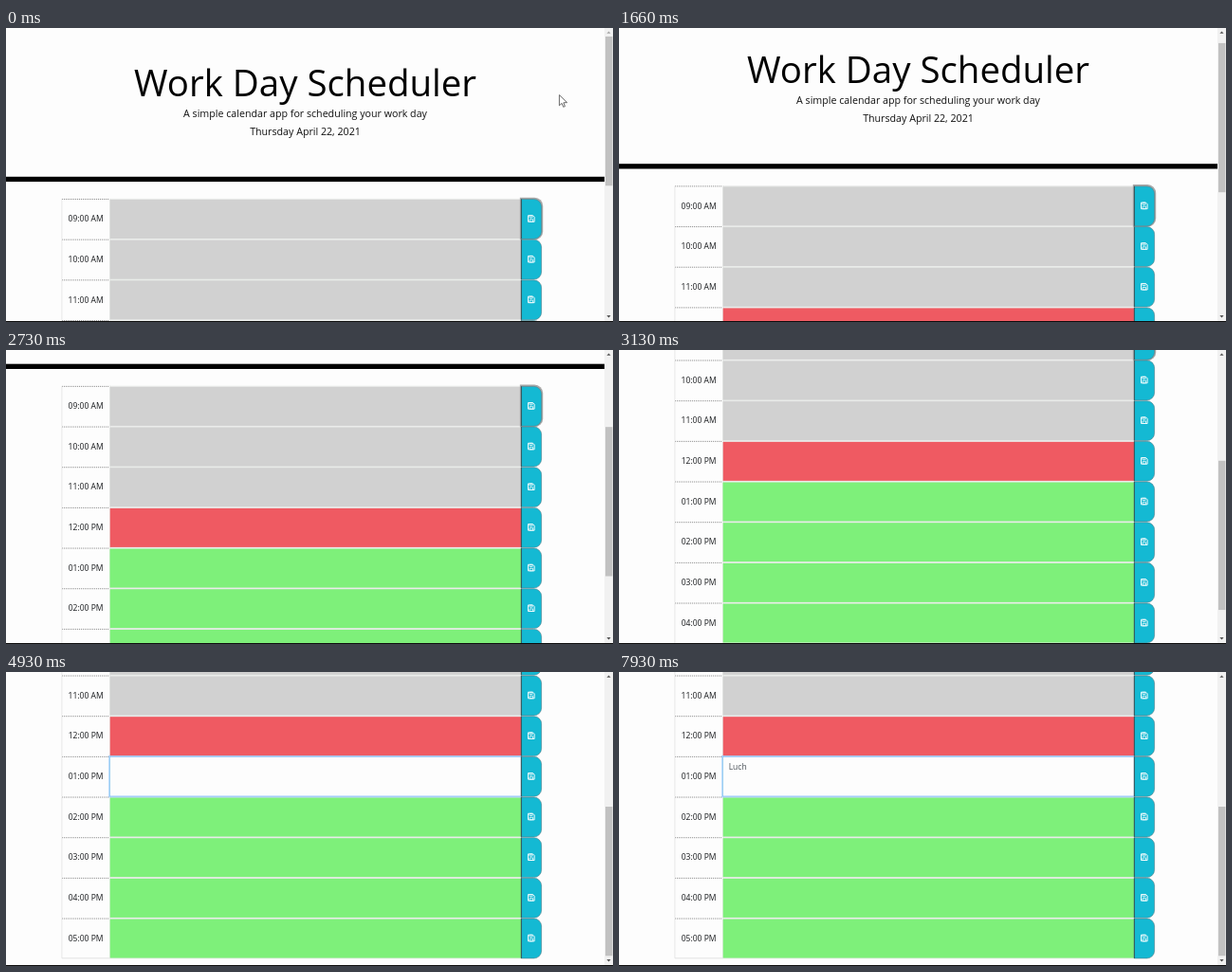
An HTML page with a canvas for the animation above (8 s loop, 640 by 310 pixels).

```html
<!DOCTYPE html>
<html lang="en">
<head>
<meta charset="utf-8">
<title>Work Day Scheduler</title>
<style>
html, body { margin: 0; width: 100%; height: 100%; overflow: hidden; background: #fdfdfd; }
canvas { display: block; width: 640px; height: 310px; }
</style>
</head>
<body>
<canvas id="stage"></canvas>
<script>
const W = 640, H = 310, LOOP = 8000, FPS = 15;
const FONT = '"Open Sans", "Noto Sans", sans-serif';
const PAPER = '#fdfdfd', GREY = '#d1d1d1', RED = '#ef5a62', GREEN = '#7ef07a', TEAL = '#14b9d3';
const HOURS = ['09:00 AM', '10:00 AM', '11:00 AM', '12:00 PM', '01:00 PM',
  '02:00 PM', '03:00 PM', '04:00 PM', '05:00 PM'];
const ROW_TOP = 180.4, ROW_STEP = 128 / 3, VIEW_W = 631;
const EDIT_ROW = 4, NOON_ROW = 3;
const MAX_SCROLL = 261.8;

// time, scroll offset
const SCROLL = [[1333, 0], [1400, 1.5], [1667, 13.6], [2133, 64], [2533, 134], [2667, 135],
  [2733, 142], [3133, 212], [3400, 253], [3533, MAX_SCROLL]];
const TYPED = [[6867, 'L'], [7067, 'Lu'], [7267, 'Luc'], [7333, 'Luch']];

const canvas = document.getElementById('stage');
const ctx = canvas.getContext('2d');
const dpr = window.devicePixelRatio || 1;
canvas.width = W * dpr;
canvas.height = H * dpr;

const clamp = (v, lo = 0, hi = 1) => Math.min(hi, Math.max(lo, v));

function rect(x, y, w, h, color) {
  ctx.fillStyle = color;
  ctx.fillRect(x, y, w, h);
}

function text(str, x, y, size, color, align = 'center') {
  ctx.font = `${size}px ${FONT}`;
  ctx.textAlign = align;
  ctx.fillStyle = color;
  ctx.fillText(str, x, y);
}

function line(x1, y1, x2, y2, color, width = 1, dash = []) {
  ctx.beginPath();
  ctx.setLineDash(dash);
  ctx.moveTo(x1, y1);
  ctx.lineTo(x2, y2);
  ctx.strokeStyle = color;
  ctx.lineWidth = width;
  ctx.stroke();
  ctx.setLineDash([]);
}

function poly(points, fill, stroke) {
  ctx.beginPath();
  points.forEach(([x, y]) => ctx.lineTo(x, y));
  ctx.closePath();
  if (fill) { ctx.fillStyle = fill; ctx.fill(); }
  if (stroke) { ctx.strokeStyle = stroke; ctx.stroke(); }
}

// Monotone cubic through the given points
function follow(points, t) {
  const last = points.length - 1;
  if (t <= points[0][0]) return points[0][1];
  if (t >= points[last][0]) return points[last][1];
  const slope = i => (points[i + 1][1] - points[i][1]) / (points[i + 1][0] - points[i][0]);
  const tangent = i => {
    if (i === 0 || i === last) return slope(Math.min(i, last - 1));
    const a = slope(i - 1), b = slope(i);
    return a + b ? 2 * a * b / (a + b) : 0;
  };
  const i = points.findIndex(p => p[0] > t) - 1;
  const [t0, v0] = points[i], [t1, v1] = points[i + 1];
  const h = t1 - t0, u = (t - t0) / h, r = 1 - u;
  return v0 * (1 + 2 * u) * r * r + tangent(i) * h * u * r * r
    + v1 * u * u * (3 - 2 * u) - tangent(i + 1) * h * u * u * r;
}

function tab(x, y, w, h, r) {
  ctx.beginPath();
  ctx.roundRect(x, y, w, h, [0, r, r, 0]);
}

function saveIcon(cx, cy) {
  ctx.save();
  ctx.translate(cx, cy);
  ctx.lineWidth = 1;
  ctx.lineJoin = 'round';
  poly([[-3.3, -3.3], [1.7, -3.3], [3.3, -1.7], [3.3, 3.3], [-3.3, 3.3]], null, '#f4fcfd');
  ctx.lineWidth = 0.8;
  ctx.strokeRect(-1.8, -3.2, 3, 2.1);
  ctx.strokeRect(-1.8, 0.8, 3.6, 2.5);
  ctx.restore();
}

function saveButton(y, focused) {
  if (focused) {
    tab(541.8, y - 1.7, 24.4, 44.6, 9);
    ctx.fillStyle = '#a9a9a9';
    ctx.fill();
  }
  tab(543.2, y + 0.1, 21.4, 41.9, 8);
  ctx.fillStyle = TEAL;
  ctx.fill();
  ctx.strokeStyle = '#5d7f86';
  ctx.lineWidth = 0.6;
  ctx.stroke();
  line(543.4, y, 543.4, y + 42, '#26444a', 0.8);
  saveIcon(553.8, y + 20.6);
}

function editor(y, focus, note) {
  const h = 42;
  rect(109.5, y + 0.6, 434, 41, GREEN);
  ctx.globalAlpha = focus;
  rect(109.5, y, 434, h, PAPER);
  ctx.strokeStyle = 'rgba(0,123,255,.25)';
  ctx.lineWidth = 1.6;
  ctx.strokeRect(108.7, y - 0.6, 435.2, h + 0.9);
  ctx.strokeStyle = '#80bdff';
  ctx.lineWidth = 0.55;
  ctx.strokeRect(109.5, y + 0.1, 433.7, h - 0.4);
  ctx.globalAlpha = 1;
  if (note) text(note, 115.7, y + 14.2, 8.533, '#495057', 'left');
}

function row(i, y, focus, note) {
  if (y > H || y + 44 < 0) return;
  line(59, y + 0.1, 109.5, y + 0.1, '#777', 0.8, [1.1, 0.9]);
  line(58.9, y, 58.9, y + 42, '#e2e2e2', 0.8);
  text(HOURS[i], 84.1, y + 23.8, 8.533, '#16181b');
  rect(109, y - 0.6, 434.5, 43, '#e9ebe9');
  if (i === EDIT_ROW) editor(y, focus, note);
  else rect(109.7, y + 0.6, 433.6, 41, i < NOON_ROW ? GREY : i === NOON_ROW ? RED : GREEN);
}

function scrollbar(offset) {
  const ends = [[3, 5.8, 3.6, offset > 0 ? '#505050' : '#a3a3a3'],
    [303, 303, 305.2, offset < MAX_SCROLL ? '#505050' : '#505050']];
  rect(VIEW_W, 0, 9, H, '#f1f1f1');
  rect(VIEW_W + 1, 9 + offset * 0.508, 7.4, 157.3, '#c1c1c1');
  poly([[633.4, 5.8], [637.6, 5.8], [635.5, 3.4]], ends[0][3]);
  poly([[633.4, 303], [637.6, 303], [635.5, 305.4]], ends[1][3]);
}

function pointer(x, y) {
  ctx.save();
  ctx.translate(x, y);
  ctx.lineWidth = 0.8;
  ctx.lineJoin = 'miter';
  poly([[0.4, 0.6], [0.4, 11.8], [3, 9.4], [4.7, 13.3], [6.4, 12.5], [4.8, 8.8], [8.5, 8.6]],
    '#fff', '#444');
  ctx.restore();
}

function drawPointer(t) {
  if (t < 1133) return pointer(583, 70);
  if (t < 3733) return;
  const u = clamp((t - 3733) / 800);
  const x = 576 - 236 * u * u * (3 - 2 * u);
  if (x > 543) pointer(x, 81 + 24 * u);
}

function draw(t) {
  const offset = follow(SCROLL, t);
  const focus = t < 4860 ? 0 : t < 4930 ? 0.5 : 1;
  const note = TYPED.reduce((s, [at, str]) => t >= at ? str : s, '');

  ctx.setTransform(dpr, 0, 0, dpr, 0, 0);
  rect(0, 0, W, H, PAPER);

  ctx.save();
  ctx.translate(0, -offset);
  text('Work Day Scheduler', 315.5, 72, 38.4, '#000');
  text('A simple calendar app for scheduling your work day', 315.5, 93.6, 10.667, '#111');
  text('Thursday April 22, 2021', 315.5, 112.8, 10.667, '#111');
  rect(0, 156.8, VIEW_W, 5.3, '#000');
  ctx.restore();

  const top = i => ROW_TOP + i * ROW_STEP - offset;
  HOURS.forEach((_, i) => { if (i !== EDIT_ROW) row(i, top(i)); });
  row(EDIT_ROW, top(EDIT_ROW), focus, note);
  line(59, top(9) - 0.8, 109.5, top(9) - 0.8, '#dcdcdc', 0.8);
  HOURS.forEach((_, i) => saveButton(top(i), i === 0 && t < 4860));

  scrollbar(offset);
  drawPointer(t);
  rect(0, 309, W, 1, '#0c0c0c');
}

const start = performance.now();
function tick() {
  const t = (performance.now() - start) % LOOP;
  draw(Math.floor((t + 7) * FPS / 1000) * 1000 / FPS + 0.5);
  requestAnimationFrame(tick);
}
tick();
</script>
</body>
</html>
```
